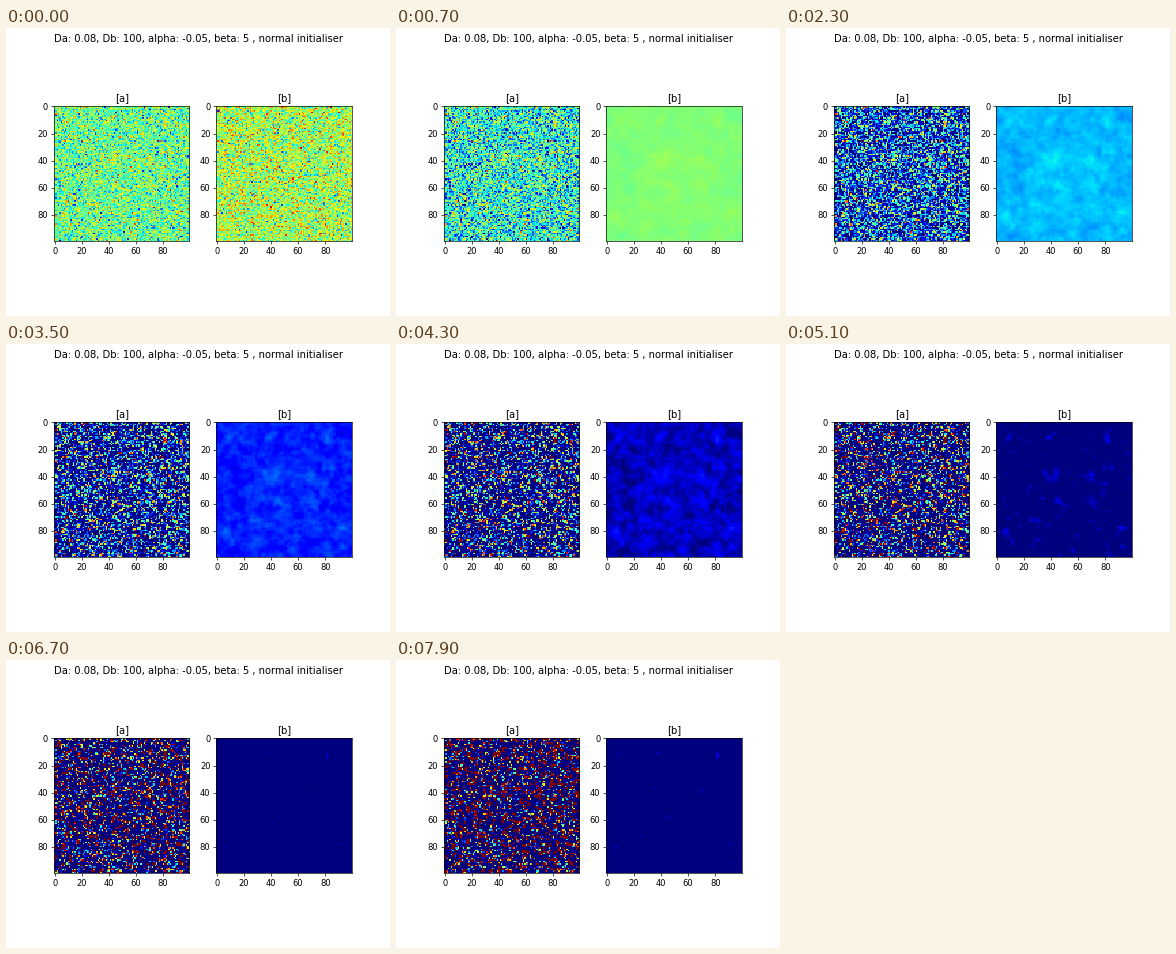
A matplotlib script that plays this animation: 384x288 px, repeating every 8 s.

```python
import numpy as np
import matplotlib.pyplot as plt
from matplotlib.animation import FuncAnimation

# FitzHugh-Nagumo reaction-diffusion on a periodic grid
Da, Db, alpha, beta = 0.08, 100, -0.05, 5
SIZE, DT, SUBSTEPS, FRAMES = 100, 0.001, 50, 80
NOISE = 0.03

# Places where the activator gets a small head start
SPOTS = [(40, 5), (84, 34), (32, 35), (38, 77), (79, 95)]


def laplacian(u):
    p = np.pad(u, 1, mode="wrap")
    return p[:-2, 1:-1] + p[2:, 1:-1] + p[1:-1, :-2] + p[1:-1, 2:] - 4 * u


def initialise():
    rng = np.random.default_rng(4)
    a, b = rng.normal(0, NOISE, (2, SIZE, SIZE))
    y, x = np.mgrid[:SIZE, :SIZE]
    for cx, cy in SPOTS:
        a += 0.4 * NOISE * np.exp(-((x - cx) ** 2 + (y - cy) ** 2) / 8)
    return a - a.mean(), b - b.mean()


def simulate():
    a, b = initialise()
    states = [(a, b)]
    for _ in range(FRAMES - 1):
        for _ in range(SUBSTEPS):
            da = Da * laplacian(a) + a - a * a * a - b + alpha
            db = Db * laplacian(b) + beta * (a - b)
            a, b = a + DT * da, b + DT * db
        states.append((a, b))
    return states


def add_panel(ax, name, field, low, high):
    ax.set_title(f"[{name}]", fontsize=12)
    image = ax.imshow(field, cmap="jet", interpolation="nearest",
                      vmin=low * NOISE, vmax=high * NOISE)
    ticks = range(0, SIZE, 20)
    ax.set(xticks=ticks, yticks=ticks)
    return image


states = simulate()

fig, (left, right) = plt.subplots(1, 2, figsize=(6.4, 4.8), dpi=60)
fig.suptitle(f"Da: {Da}, Db: {Db}, alpha: {alpha}, beta: {beta} , normal initialiser",
             fontsize=12)
images = [add_panel(left, "a", states[0][0], -3.8, 4.1),
          add_panel(right, "b", states[0][1], -4.3, 3.5)]


def update(i):
    for image, field in zip(images, states[i]):
        image.set_data(field)
    return images


anim = FuncAnimation(fig, update, frames=FRAMES, interval=100,
                     repeat=True, repeat_delay=0)
plt.show()
```
